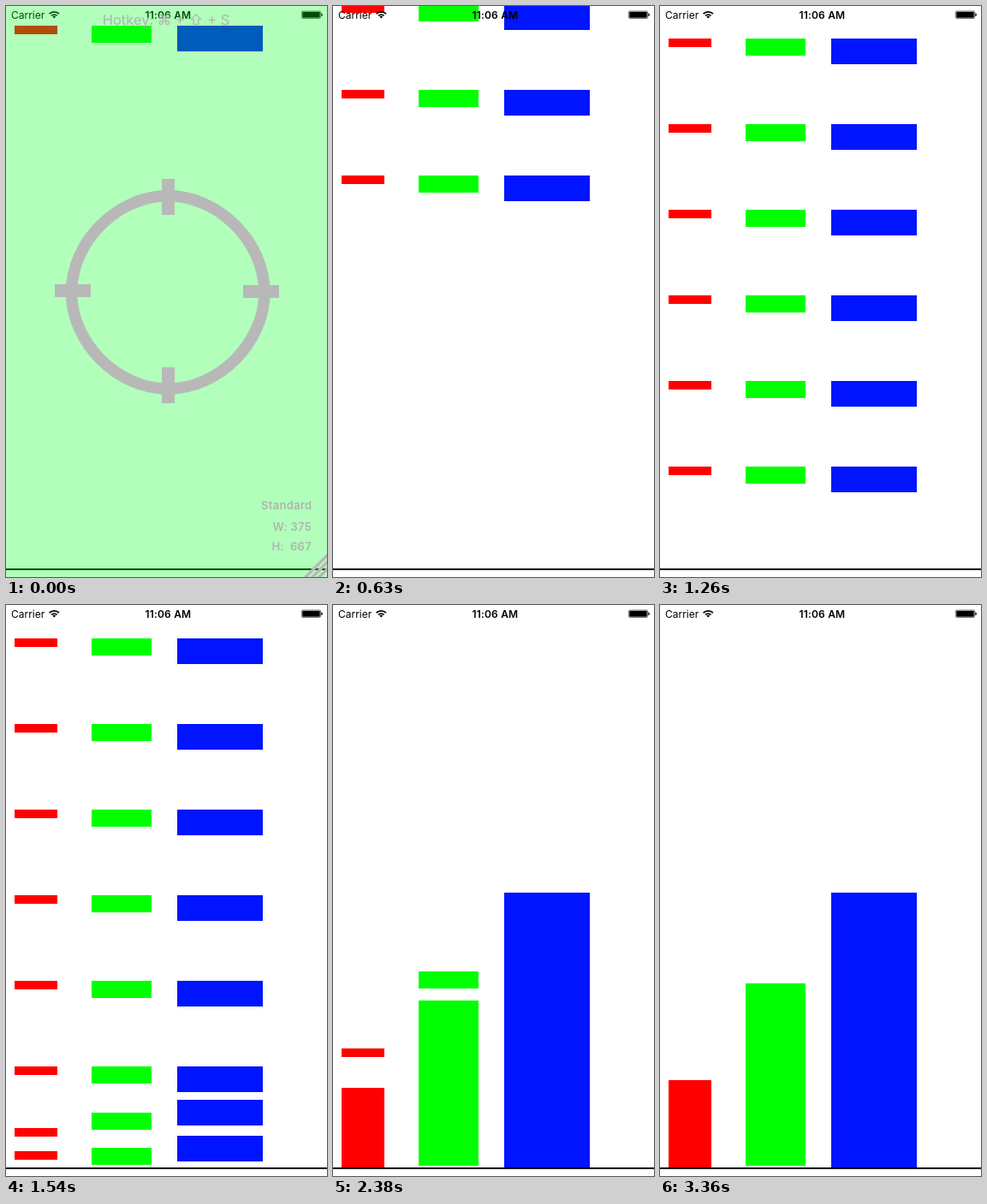
Animation, 375 px wide and 667 px high, one loop 3430 ms. Source, as an HTML page:

```html
<!DOCTYPE html>
<html>
<head>
<meta charset="utf-8">
<style>
html, body { margin: 0; width: 100%; height: 100%; overflow: hidden; background: #fff; }
svg { display: block; }
text { font-family: Inter, Roboto, "DejaVu Sans", sans-serif; white-space: pre; }
</style>
</head>
<body>
<svg width="375" height="667" viewBox="0 0 375 667">
  <rect width="375" height="667" fill="#fff"/>
  <g id="boxes" shape-rendering="crispEdges"></g>
  <rect y="657" width="375" height="2"/>

  <g id="status" font-size="12">
    <text x="6" y="14.5">Carrier</text>
    <g fill="none" stroke="#000" stroke-width="1.7">
      <path d="M50.6 9.2a8 8 0 0 1 11.4 0"/>
      <path d="M53 11.4a4.7 4.7 0 0 1 6.6 0"/>
    </g>
    <path d="M56.3 14.4l-1.9 -2a2.7 2.7 0 0 1 3.8 0z"/>
    <text x="189.4" y="14.5" text-anchor="middle" font-weight="600" letter-spacing=".2">11:06 AM</text>
    <rect x="345.5" y="6" width="22" height="8.5" rx="1" fill="none" stroke="#555" stroke-width=".8"/>
    <rect x="346.3" y="6.8" width="20.4" height="6.9"/>
    <path d="M368.3 8.3q1.6 .3 1.6 2t-1.6 2z"/>
  </g>

  <g id="overlay">
    <rect width="375" height="667" fill="rgba(0,255,30,.3)"/>
    <g fill="#b9b8b9">
      <path id="ring" fill="none" stroke="#b9b8b9" stroke-width="13.5"/>
      <rect x="182" y="202" width="15" height="42"/>
      <rect x="182" y="422" width="15" height="42"/>
      <rect x="57" y="325" width="42" height="15"/>
      <rect x="277" y="326" width="42" height="15"/>
    </g>
    <path d="M349 668L376 641M357 668L376 649M365 668L376 657" stroke="#b9b8b9" stroke-width="3.6"/>
    <g fill="#b0b4b0">
      <text x="187" y="22" text-anchor="middle" font-size="16.5">Hotkey: ⌘ + ⇧ + S</text>
      <g text-anchor="end" font-size="13" font-weight="600" letter-spacing=".3">
        <text x="357.5" y="588">Standard</text>
        <text x="357" y="613">W: 375</text>
        <text x="357" y="636">H:  667</text>
      </g>
    </g>
  </g>
</svg>
<script>
const FRAME = 70, COUNT = 49, DT = 2, ROWS = 11;
const START_Y = 22.51, START_V = 0.1444;       // px, px/ms
const GRAVITY = 0.000449, DRAG = 0.0000895;    // px/ms², 1/ms

// pitch: spacing in a settled pile, where boxes sink into each other a little
const columns = [
  { x: 10, w: 50, h: 10, pitch: 9.2, floor: 656.6, lastBounce: 0.21, color: '#f00' },
  { x: 100, w: 70, h: 20, pitch: 19.3, floor: 655.4, lastBounce: 0.236, color: '#0f0' },
  { x: 200, w: 100, h: 30, pitch: 29.1, floor: 657, lastBounce: 0, color: '#0014ff' }
];

// Returns the box tops of one column for every displayed frame.
function simulate({ h, pitch, floor, lastBounce }) {
  const y = [], v = [], frames = [];
  for (let i = 0; i < ROWS; i++) { y[i] = START_Y - 100 * i; v[i] = START_V; }
  const limit = i => i ? y[i - 1] - pitch : floor - h;
  const closing = i => v[i] - (i ? v[i - 1] : 0);

  for (let t = 0; t < FRAME * COUNT; t += DT) {
    if (t % FRAME === 0) frames.push(y.slice());
    const contacts = [];
    for (let i = 0; i < ROWS; i++) {
      const before = v[i];
      v[i] += (GRAVITY - DRAG * v[i]) * DT;
      y[i] += (before + v[i]) / 2 * DT;
    }
    for (let i = 0; i < ROWS; i++) {
      if (limit(i) - y[i] > 0.01) continue;
      y[i] = Math.min(y[i], limit(i));
      const bounce = i < 2 && t < 1560 ? 0.45 : i === ROWS - 1 ? lastBounce : 0;
      const speed = closing(i);
      contacts.push({ i, push: 0, kick: speed > 0.3 ? bounce * speed : 0 });
    }
    for (let n = 0; n < 100; n++) {
      for (const c of contacts) {
        const i = c.i;
        const push = Math.max(0, c.push + (closing(i) + c.kick) * (i ? 0.5 : 1));
        const change = push - c.push;
        c.push = push;
        v[i] -= change;
        if (i) v[i - 1] += change;
      }
    }
  }
  return frames;
}

const group = document.getElementById('boxes');
const overlay = document.getElementById('overlay');

for (const col of columns) {
  col.frames = simulate(col);
  col.rects = col.frames[0].map(() => {
    const rect = document.createElementNS('http://www.w3.org/2000/svg', 'rect');
    const attrs = { x: col.x, width: col.w, height: col.h, fill: col.color };
    for (const key in attrs) rect.setAttribute(key, attrs[key]);
    return group.appendChild(rect);
  });
}

// Ring of four curves, slightly flat on the diagonals
const R = 112.7, K = R * 0.525;
document.getElementById('ring').setAttribute('d',
  `M189.2 ${334.5 - R}c${K} 0 ${R} ${R - K} ${R} ${R}s${K - R} ${R} ${-R} ${R}` +
  `s${-R} ${K - R} ${-R} ${-R}s${R - K} ${-R} ${R} ${-R}z`);

function draw(now) {
  const frame = Math.floor(now / FRAME) % COUNT;
  for (const { rects, frames } of columns)
    rects.forEach((rect, i) => rect.setAttribute('y', Math.round(frames[frame][i])));
  overlay.style.display = frame ? 'none' : '';
}

const start = performance.now();
function tick() {
  draw(performance.now() - start);
  requestAnimationFrame(tick);
}
tick();
</script>
</body>
</html>
```
